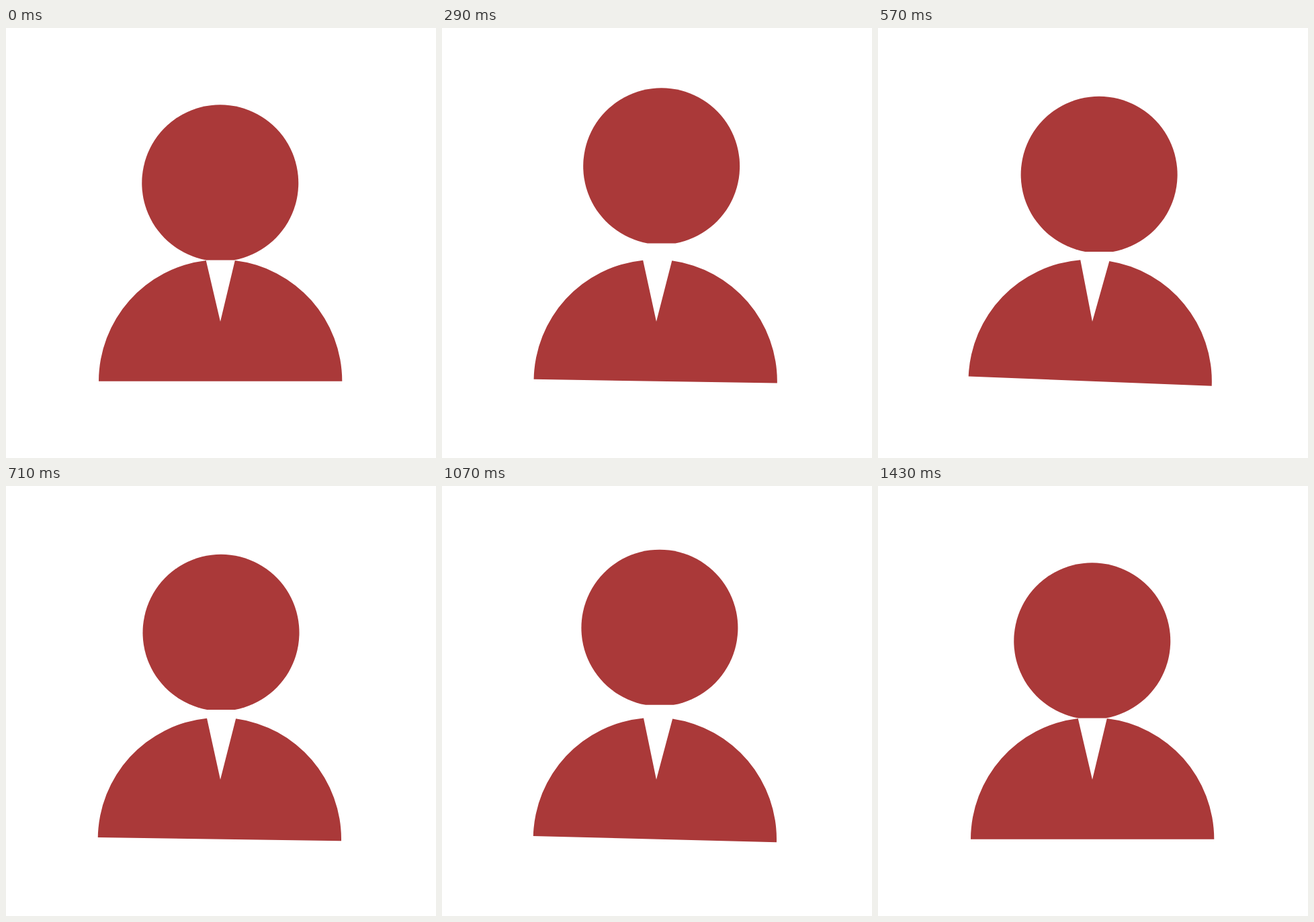
Recreate the animation shown at these times as an HTML page. Size 640 px wide and 640 px high, loop 2430 ms.

```html
<!DOCTYPE html>
<html>
<head>
<meta charset="utf-8">
<style>
  html, body { margin: 0; width: 100%; height: 100%; overflow: hidden; background: #fff; }
  svg { display: block; width: 100vw; height: 100vh; fill: #aa3939; }
</style>
</head>
<body>
<svg viewBox="0 0 640 640">
  <path id="body" d="M138 525.7A181.2 181.2 0 0 1 297.7 346L319 437L340.8 346A181.2 181.2 0 0 1 500.3 525.7Z"/>
  <path id="head" d="M298 345.4A116.5 116.5 0 1 1 339.5 345.4Z"/>
</svg>
<script>
const LOOP = 2430, FPS = 14, END = 19.9;
const body = document.getElementById("body");
const head = document.getElementById("head");
const clamp = x => Math.max(0, Math.min(1, x));

// Pose at step k: the head lifts, sways together with the body, then drops back.
function pose(k) {
  const d = Math.min(k, END - k);       // steps to the nearer end
  const ease = clamp(d / 3) ** 2;
  const swing = clamp((d - 3) / 3);
  const wave = Math.cos(1.16 * (k - 11.514));
  const lean = (k < END / 2 ? 4.85 : -4.85) * ease * (1 - swing);
  return {
    sway: lean - swing * (2.83 + 22.23 * wave),
    lift: d > 3 ? 12.5 + 12.5 * clamp((7 - d) / 3) ** 1.6 : 8.1 * ease,
    tilt: swing * (0.2 - 3.4 * wave)
  };
}

function draw(now) {
  // step changes fall on whole hundredths of a second
  const t = Math.floor(now % LOOP / 10) * 10;
  const { sway, lift, tilt } = pose(Math.floor((t + 5) * FPS / 1000));
  head.setAttribute("transform", `translate(${sway} ${-lift})`);
  body.setAttribute("transform", `rotate(${tilt} 319 437)`);
}

const start = performance.now();
function tick() {
  draw(performance.now() - start);
  requestAnimationFrame(tick);
}
tick();
</script>
</body>
</html>
```
